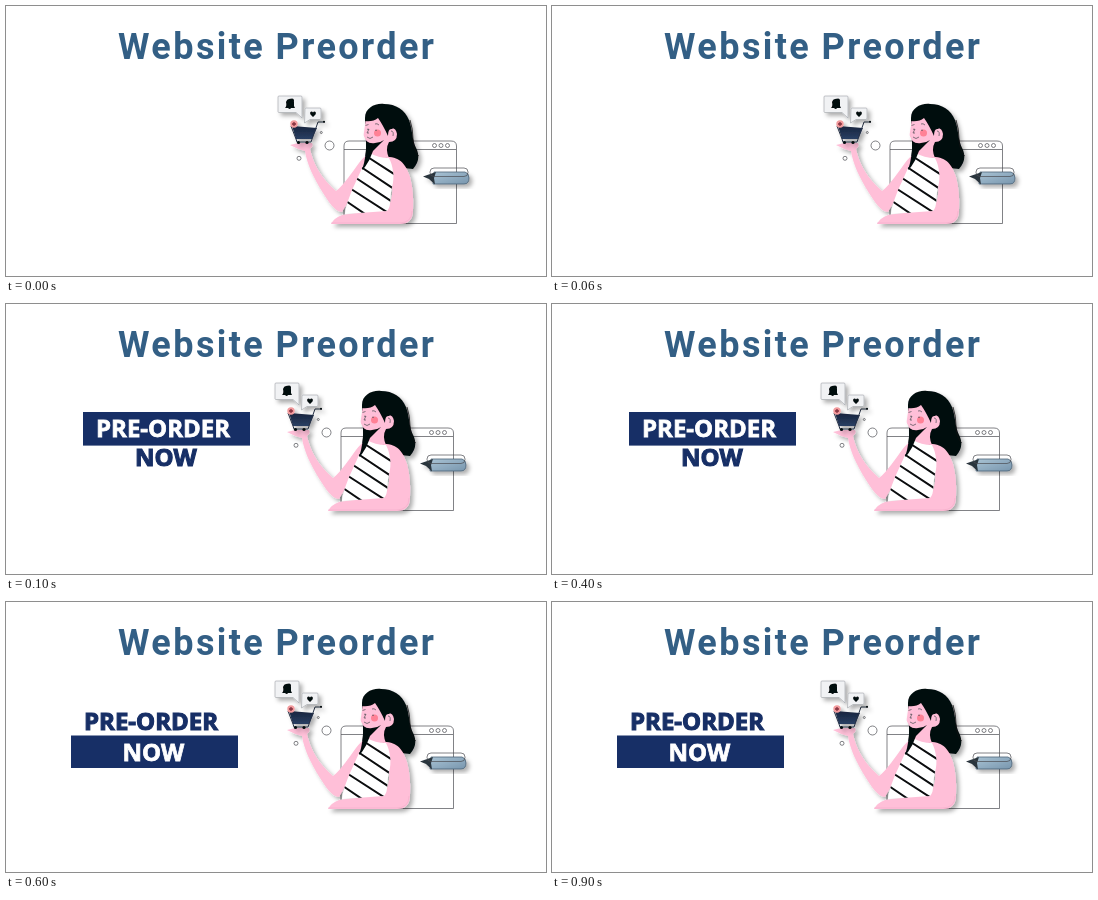
Animation of 540x270 px, one loop 1100 ms. Source, as an HTML page:

```html
<!DOCTYPE html>
<html lang="en">
<head>
<meta charset="utf-8">
<title>Website Preorder</title>
<style>
  html, body { margin: 0; width: 100%; height: 100%; overflow: hidden; background: #fff; }
  svg { display: block; width: 540px; height: 270px; }
  .title { font: 700 36px Roboto, sans-serif; letter-spacing: 2.4px; word-spacing: -1px; fill: #335f85; }
  .label { font: 700 24px "Open Sans", sans-serif; fill: #fff; stroke: #fff; stroke-width: .8; }
  .dark { fill: #172f66; stroke: #172f66; stroke-width: 1.1; }
  .line { fill: none; stroke: #4b4d52; stroke-width: .7; }
  .skin { fill: #ffbfd8; }
  .ink { fill: #050a0d; }
</style>
</head>
<body>
<svg viewBox="0 0 540 270">
  <defs>
    <filter id="shadow" x="-20%" y="-20%" width="140%" height="150%">
      <feDropShadow dx="3" dy="3" stdDeviation="2.2" flood-color="#000" flood-opacity=".32"/>
    </filter>
    <linearGradient id="steel" x2="1" y2="1">
      <stop stop-color="#a9c3d4"/><stop offset="1" stop-color="#7896ae"/>
    </linearGradient>
    <linearGradient id="navy" x2="0" y2="1">
      <stop stop-color="#18243e"/><stop offset="1" stop-color="#293f63"/>
    </linearGradient>
    <clipPath id="shirt">
      <path id="shirtShape" d="M360 135Q368 138 380 141C384 148 386 161 383 170C380 181 383 189 378 194L336 197C338 183 344 171 349 160Q355 147 360 135Z"/>
    </clipPath>
  </defs>

  <text class="title" x="112" y="53">Website Preorder</text>

  <g id="scene">
    <!-- browser window -->
    <g class="line">
      <path d="M335 207V129Q335 124 340 124H442Q447.500 124 447.500 129V206.500H335M335 132.500H447"/>
      <circle cx="425.500" cy="128.500" r="2"/>
      <circle cx="432" cy="128.500" r="2"/>
      <circle cx="438.500" cy="128.500" r="2"/>
      <circle cx="320.500" cy="128.500" r="4.500"/>
      <circle cx="290" cy="141.300" r="2"/>
      <circle cx="312.300" cy="115.500" r="1"/>
    </g>

    <!-- woman -->
    <g filter="url(#shadow)">
      <path class="ink" d="M356 101C356 91 366 86 375 87C387 87 396 93 400 103C404 113 402 121 408 133Q412 143 404 152Q390 151 378 144L353 152Q358 138 357 125Z"/>
      <path class="skin" d="M281 128Q290 125 303 126Q305 129 301 132C304 147 313 162 327 174C335 168 344 154 350 146Q355 139 361 136L356 156L333 195C326 195 319 184 314 176C304 160 298 147 296 134Q288 132 281 128Z"/>
      <path class="skin" d="M378 140C392 140 397 148 401 160Q405 175 404 193Q404 207 391 207H322Q325 201 333 198L378 192Q385 182 383 165Z"/>
      <use href="#shirtShape" fill="#fff"/>
      <g clip-path="url(#shirt)" stroke="#080c10" stroke-width="2" fill="none">
        <path d="M354 137L388 159M349 148L388 174M344 159L388 188M339 170L384 199M334 182L362 201"/>
      </g>
      <path class="skin" d="M357 101L355 115Q354 119 356 121Q358 127 365 127L361 136Q369 141 380 141Q376 132 380 125Q388 125 388 117Q387 110 381 111Q373 105 370 98Q364 103 357 101Z"/>
      <path class="ink" d="M356 101Q366 98 370 92Q376 107 386 109L383 112Q379 111 379 119Q374 108 369 101Q364 105 356 104Z"/>
      <path class="ink" d="M357 124Q361 127 366 126Q371 126 375 123Q368 130 364 134Q361 143 356 150L353 153Q358 138 357 124Z"/>
    </g>
    <circle cx="368.500" cy="116" r="3.500" fill="#ff8196"/>
    <path class="line" d="M356.500 108.500l3-1M366 107q2-1 4 1M358 112q1 1 2 0M366 113q1 1 2 0M360 112l-2 4h2M358 120q3 3 6 0M382 114q3 0 2 5"/>
    <path d="M322 206H390Q403 206 403 194" fill="none" stroke="#f4adc9" stroke-width=".6"/>
    <path d="M401 103Q404 112 404 122T409.500 139" fill="none" stroke="#111" stroke-width=".8"/>

    <!-- cart -->
    <g filter="url(#shadow)">
      <path d="M283 109L308 111L303 122H287Z" fill="url(#navy)"/>
      <path d="M282 109L287 122L288 125H302L309 105H316" fill="none" stroke="#253044"/>
      <g class="ink">
        <circle cx="289.500" cy="125.500" r="1.600"/>
        <circle cx="298" cy="125.500" r="1.600"/>
        <circle cx="315" cy="104.700" r="1"/>
      </g>
      <circle cx="285" cy="107" r="3.700" fill="#f39b9d"/>
      <path d="M283 107h4M285 105v4" stroke="#842f3d" stroke-width="1.300"/>
    </g>

    <!-- speech bubbles -->
    <g filter="url(#shadow)">
      <g fill="#f1f2f4" stroke="#9ca0a5" stroke-width=".6">
        <path d="M270 79H292Q293 79 293 80V101L287 95.500H270Q269 95.500 269 94.500V80Q269 79 270 79Z"/>
        <path d="M297 91H311Q312 91 312 92V101Q312 102.500 311 102.500H301L295.500 106L296 92Q296 91 297 91Z"/>
      </g>
      <path class="ink" d="M276 91Q278 89 277 85Q278 82 280 82Q284 81 285 85V89L286 91H282Q281 93 279 91Z"/>
      <circle class="ink" cx="283" cy="83.500" r="2"/>
      <path class="ink" d="M304 100L301.500 97.500C300 95 303 93.500 304 95.500C305 93.500 308 95 306.500 97.500Z"/>
    </g>

    <!-- pen -->
    <g filter="url(#shadow)">
      <path d="M425 155H456Q460 156 460 161Q460 167 455 167H424Z" fill="url(#steel)" stroke="#40566a" stroke-width=".7"/>
      <path d="M414 159.500L427 155L425 161L426 167.500L420 162Z" fill="#29343d"/>
    </g>
    <rect class="line" x="421" y="151" width="38" height="8.500" rx="4"/>
  </g>

  <g id="offer">
    <rect x="77" y="108" width="167" height="33.600" fill="#172f66"/>
    <text class="label" x="90" y="133">PRE-ORDER</text>
    <text class="label dark" x="129" y="162">NOW</text>
  </g>
  <g id="now">
    <text class="label dark" x="78" y="128">PRE-ORDER</text>
    <rect x="65" y="133.500" width="167" height="32.500" fill="#172f66"/>
    <text class="label" x="116.500" y="158.500">NOW</text>
  </g>
</svg>
<script>
  const [scene, offer, now] = ["scene", "offer", "now"].map(id => document.getElementById(id));
  const show = (node, visible) => node.setAttribute("visibility", visible ? "visible" : "hidden");

  function draw() {
    const time = performance.now() % 1100;
    scene.setAttribute("transform", time < 100 ? "translate(3 11)" : "");
    show(offer, time >= 100 && time < 600);
    show(now, time >= 600);
    requestAnimationFrame(draw);
  }
  draw();
</script>
</body>
</html>
```
